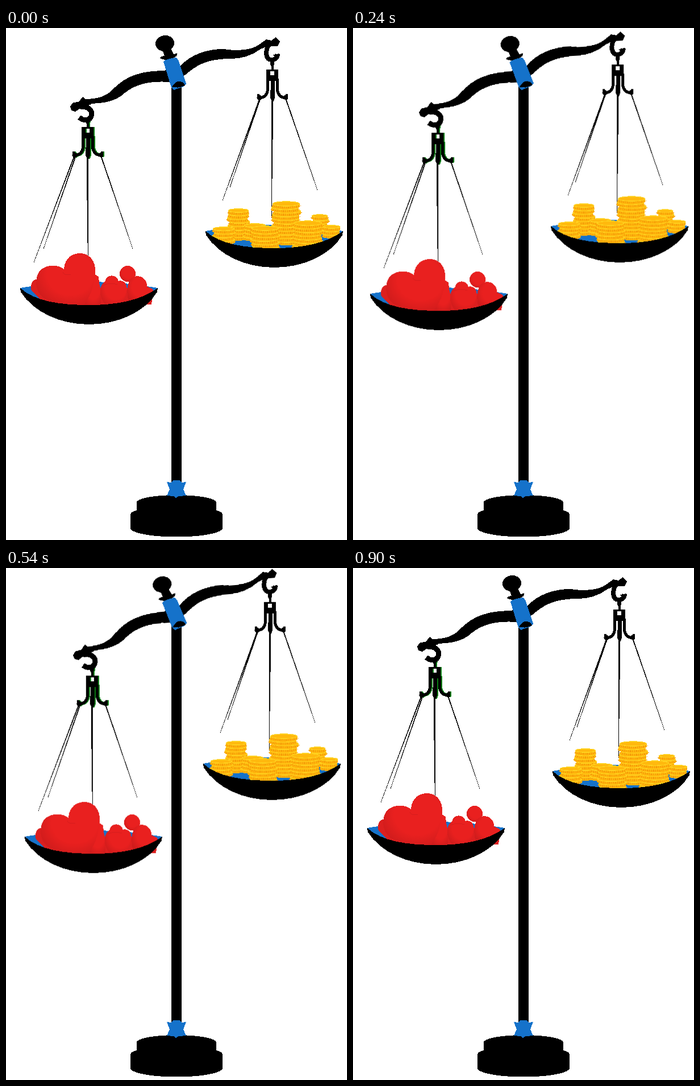
Write an HTML page that moves like this. It is 600x900 px and loops after 930 ms.

```html
<!DOCTYPE html>
<html lang="en">
<head>
<meta charset="utf-8">
<title>Balance scale</title>
<style>
html, body { margin: 0; width: 100%; height: 100%; overflow: hidden; background: #fff; }
svg { display: block; width: 600px; height: 900px; }
#beam { transform-origin: 299px 85px; }
.blue { fill: #1572ca; }
.line { fill: none; stroke: currentColor; }
.heart { fill: url(#red); }
</style>
</head>
<body>
<svg viewBox="0 0 600 900" shape-rendering="crispEdges">
  <defs>
    <radialGradient id="red" cx=".58" cy=".4" r=".66">
      <stop offset=".6" stop-color="#e9201f"/>
      <stop offset="1" stop-color="#cf1c1c"/>
    </radialGradient>
    <g id="hanger" fill="currentColor">
      <path d="M140 159H147V165L145.500 168V175H141.500V168L140 165Z"/>
      <path fill-rule="evenodd" d="M133 174H154V194H133ZM140 176.500V184H147V176.500Z"/>
      <path class="line" stroke-width="5" d="M135.700 190V207Q135 223 121 224M152.300 190V207Q153 223 167 224"/>
      <path d="M140.500 190H147.500V210L148.500 222L146 230H142.500L139.500 222L140.500 210Z"/>
      <ellipse cx="121" cy="223.500" rx="4.500" ry="4.500"/>
      <ellipse cx="167.500" cy="223" rx="4" ry="4.500"/>
      <path d="M117 222V217H121V222ZM167 222V216.500H170.500V222Z"/>
    </g>
    <path id="inside" class="blue" d="M25 457Q146 435 267 457Q242 491 146 491Q50 491 25 457Z"/>
    <path id="bowl" d="M25 457C50 480 94 487 146 487C198 487 238 478 267 457L266 464C244 500 196 521 146 521C96 521 49 500 26 464Z"/>
  </defs>

  <path d="M291 98H309V830H291Z"/>
  <path d="M230 834A70 13 0 0 1 370 834V856H230Z"/>
  <path d="M219 856Q219 850 230 848H370Q381 850 381 856V879A81 15.500 0 0 1 219 879Z"/>
  <path class="blue" d="M283 798L291 799L294 795H306L309 799L317 798L312 811L317 822L304 823L299 826L295 823L283 822L288 811Z"/>

  <g id="left">
    <use href="#hanger" x="2" color="#087d12"/>
    <use href="#hanger"/>
    <g id="leftStrings"></g>
    <use href="#inside"/>
    <path fill="#dc1f1f" d="M60 442C46 438 42 452 45 462L70 486H256L259 460L248 454L165 462L163 437L150 430Z"/>
    <circle class="heart" cx="214" cy="432" r="14"/>
    <path class="heart" d="M150 432Q164 432 163 446L167 460V488H135Z"/>
    <path class="heart" d="M174 446C176 432 196 432 198 445C204 442 213 447 213 459C212 474 203 483 197 488H176C164 474 161 455 174 446Z"/>
    <path class="heart" d="M218 443C226 432 244 434 248 450Q249 454 247 457Q258 455 260 463L248 480L216 483C212 468 212 452 218 443Z"/>
    <path class="heart" d="M102 424C103 404 117 396 130 396C148 396 158 411 157 428C156 454 147 475 136 488C108 487 82 484 65 474C51 463 50 440 59 427C70 415 92 415 102 424Z"/>
    <path class="line" color="#d51d1d" stroke-width="1" d="M100 429Q103 436 114 433M171 452Q185 447 196 451"/>
    <use href="#bowl"/>
  </g>

  <g id="right">
    <use href="#hanger" x="325" y="-101"/>
    <g id="rightStrings"></g>
    <use href="#inside" x="326" y="-100"/>
    <g id="coins"></g>
    <use href="#bowl" x="326" y="-100"/>
  </g>

  <g id="beam">
    <path d="M138 125C160 125 172 121 184 112C201 94 222 75 278 75L307 66C325 48 350 37 383 37C415 42 436 37 447 28L458 20L463 31L448 37C432 49 414 54 396 54C352 54 335 66 316 82L288 95C246 92 225 102 209 114C192 130 172 132 148 133L136 138Z"/>
    <path d="M113 138L118 131L128 130L135 121L140 126L150 126V134L140 138L128 143L122 147L115 145Z"/>
    <path class="line" stroke-width="9" d="M131 139C146 137 152 146 150.500 153C148 164 137 164 129 157"/>
    <path d="M445 30L458 20L467 22L475 16L482 24L478 32L467 32L460 35Z"/>
    <path class="line" stroke-width="8" d="M463 28C455 42 457 55 467 56C474 56 477 53 478 46"/>
    <path d="M470 47L481 45V52L474 53Z"/>
    <ellipse cx="279.500" cy="27" rx="16.500" ry="14" transform="rotate(-8 279.500 27)"/>
    <path d="M275 38L290 36L295 46L301 44Q303 50 292 54Q278 58 271 53Q273 49 279 49Z"/>
    <path class="blue" d="M277 59Q281 54 300 52L304 58L317 98L313 103L303 106L296 109L291 105Z"/>
    <path d="M292 104Q297 93 307 94Q314 96 315 101Q304 106 298 104Z"/>
  </g>
</svg>
<script>
const $ = id => document.getElementById(id);

// Strings thin out from top to bottom: [x1, y1, x2, y2, top width]
const taper = ([x1, y1, x2, y2, w]) =>
  `<path d="M${x1 - w / 2} ${y1}H${x1 + w / 2}L${x2 + 0.35} ${y2}H${x2 - 0.35}Z"/>`;

$('leftStrings').innerHTML = [
  [119.5, 227, 49, 412, 2],
  [122, 227, 66, 388, 2],
  [143.500, 228, 144.500, 425, 4],
  [167.500, 226, 223, 388, 2]
].map(taper).join('');

$('rightStrings').innerHTML = [
  [446, 126, 381, 303, 2.5],
  [446.500, 126, 394, 280, 2.5],
  [468.500, 128, 467, 345, 4],
  [492.500, 125, 548, 285, 2]
].map(taper).join('');

function coin(x, y, rx) {
  const ry = rx / 6, arc = `A${rx} ${ry} 0 0 0`;
  const edge = `M${x - rx} ${y + 2.5}${arc} ${x + rx} ${y + 2.5}`;
  return `<path fill="#ffb50c" d="M${x - rx} ${y}V${y + 5}${arc} ${x + rx} ${y + 5}V${y}Z"/>
    <path class="line" color="#f39a08" stroke-width="3.5" stroke-dasharray="1.3 2.2" d="${edge}"/>
    <ellipse cx="${x}" cy="${y}" rx="${rx - 0.5}" ry="${ry}" fill="#ffb90d" stroke="#ffd21f" stroke-width="1.4"/>`;
}

function stack([x, top, n, rx]) {
  let out = '';
  for (let i = n - 1; i >= 0; i--) {
    const shift = i ? 2 * Math.sin(i * 2.3 + x) : 0;
    out += coin(x + shift, top + rx / 6 + i * 6.4, rx);
  }
  return out;
}

// Back to front: centre, top, coins, radius
$('coins').innerHTML = [
  [552, 328, 5, 14], [493, 305, 11, 24], [409, 318, 8, 18],
  [438, 344, 4, 19], [573, 347, 3, 15], [383, 350, 4, 19],
  [531, 339, 7, 25], [456, 348, 6, 24]
].map(stack).join('');

function swing(id, rest, tilted) {
  const easing = 'steps(15)';
  $(id).animate([
    { transform: rest, offset: 0, easing },
    { transform: tilted, offset: 15 / 31, easing },
    { transform: rest, offset: 30 / 31 },
    { transform: rest, offset: 1 }
  ], { duration: 930, iterations: Infinity, delay: -1 });
}

const still = 'translate(0px, 0px)';
swing('beam', 'rotate(0deg)', 'rotate(-6deg)');
swing('left', still, 'translate(9.7px, 19px)');
swing('right', still, 'translate(-5.2px, -16.5px)');
</script>
</body>
</html>
```
